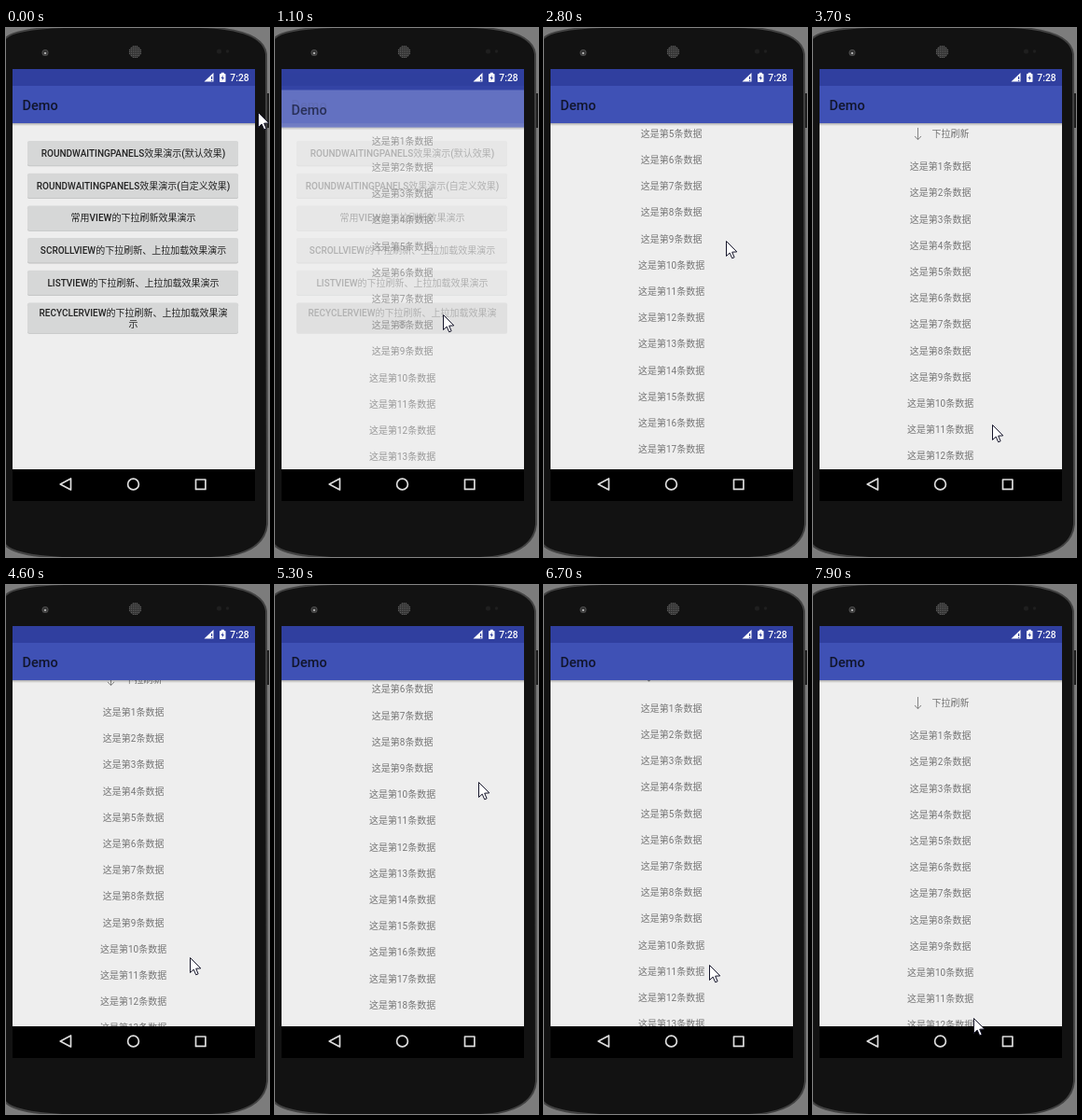
Recreate the animation shown at these times as an HTML page with a canvas. Size 282 by 567 pixels, loop 8 s.

```html
<!DOCTYPE html>
<html lang="zh-CN">
<head>
<meta charset="utf-8">
<title>Demo</title>
<style>
html, body { margin: 0; width: 100%; height: 100%; overflow: hidden; background: #7c7c7c; }
canvas { display: block; width: 282px; height: 567px; }
</style>
</head>
<body>
<canvas id="stage"></canvas>
<script>
const W = 282, H = 567, LOOP = 8000, STEP = 100;
const FONT = 'Roboto, "Noto Sans CJK SC", "Noto Sans CJK", sans-serif';
const LEFT = 7, TOP = 44, WIDTH = 260, BOTTOM = 507;
const LIST_TOP = 102, LIST_END = 473, ROW = 28.2, HEADER_GAP = 35;
const REST = 116.5, DAMPING = 0.47;

// Pointer moves: start, end, target x, target y
const MOVES = [
  [0, 300, 180, 307], [1400, 1900, 180, 370], [2100, 2800, 195, 228],
  [3000, 3800, 191, 453], [4400, 5300, 218, 211], [5300, 5500, 217, 220],
  [5700, 6700, 177, 407], [6700, 7900, 172, 464]
];
// When the finger grabs the list, and the pointer height that means zero scroll
const GRABS = [[2100, 227.8], [3100, 240.4], [5800, 257.5], [7600, 251.8]];

const PULL = '的下拉刷新、上拉加载效果演';
const BUTTONS = [
  ['ROUNDWAITINGPANELS效果演示(默认效果)'],
  ['ROUNDWAITINGPANELS效果演示(自定义效果)'],
  ['常用VIEW的下拉刷新效果演示'],
  [`SCROLLVIEW${PULL}示`],
  [`LISTVIEW${PULL}示`],
  [`RECYCLERVIEW${PULL}`, '示']
];

const canvas = document.getElementById('stage');
const ctx = canvas.getContext('2d');
const dpr = window.devicePixelRatio || 1;
canvas.width = W * dpr;
canvas.height = H * dpr;

const clamp = v => Math.min(1, Math.max(0, v));

function pointerAt(t) {
  let x = 270, y = 90;
  for (const [start, end, tx, ty] of MOVES) {
    const p = clamp((t - start) / (end - start));
    x += (tx - x) * p;
    y += (ty - y) * p;
  }
  return [x, y];
}

// Centre of the first row: follows the finger, damped when pulled past the top
function scrollAt(t) {
  const grab = GRABS.filter(g => g[0] <= t).pop();
  if (!grab) return REST;
  const over = pointerAt(t)[1] - grab[1] - REST;
  if (over < 0) return REST + over;
  return REST + (grab === GRABS[0] ? 0 : over * DAMPING);
}

function rect(x, y, w, h, fill) {
  ctx.fillStyle = fill;
  ctx.fillRect(x, y, w, h);
}

function box(x, y, w, h, r, fill) {
  ctx.beginPath();
  ctx.roundRect(x, y, w, h, r);
  ctx.fillStyle = fill;
  ctx.fill();
}

function disc(x, y, r, fill) {
  ctx.beginPath();
  ctx.arc(x, y, r, 0, Math.PI * 2);
  ctx.fillStyle = fill;
  ctx.fill();
}

function poly(points, fill) {
  ctx.beginPath();
  points.forEach(([x, y]) => ctx.lineTo(x, y));
  if (!fill) return;
  ctx.closePath();
  ctx.fillStyle = fill;
  ctx.fill();
}

function stroke(color, width) {
  ctx.strokeStyle = color;
  ctx.lineWidth = width;
  ctx.stroke();
}

function text(str, x, baseline, size, weight, color, align = 'center') {
  ctx.font = `${weight} ${size}px ${FONT}`;
  ctx.textAlign = align;
  ctx.fillStyle = color;
  ctx.fillText(str, x, baseline);
}

// Centred line with medium Latin and regular Chinese
function label(str, x, baseline) {
  const runs = str.match(/[ -~]+|[^ -~]+/g).map(run => {
    const weight = run < '~' ? 500 : 400;
    ctx.font = `${weight} 10px ${FONT}`;
    return { run, weight, width: ctx.measureText(run).width };
  });
  x -= runs.reduce((sum, r) => sum + r.width, 0) / 2;
  for (const { run, weight, width } of runs) {
    text(run, x, baseline, 10, weight, '#222', 'left');
    x += width;
  }
}

function drawPhone() {
  rect(0, 0, W, H, '#7c7c7c');
  box(279, 70, 5, 37, 1, '#1b1b1b');
  ctx.beginPath();
  ctx.moveTo(-2, 13);
  ctx.quadraticCurveTo(4, 1, 62, -1);
  ctx.lineTo(208, -1);
  ctx.quadraticCurveTo(276, 1, 279, 28);
  ctx.lineTo(280, 532);
  ctx.quadraticCurveTo(277, 565, 220, 568);
  ctx.lineTo(60, 568);
  ctx.quadraticCurveTo(4, 565, -2, 552);
  ctx.closePath();
  ctx.fillStyle = '#121212';
  ctx.fill();
  stroke('#424242', 2);

  disc(42, 26.5, 3.5, '#4c4c4c');
  disc(42, 26.5, 2.4, '#2c2c2c');
  disc(42, 27, 1.3, '#a8a8a8');
  disc(138.5, 25.5, 6.6, '#333');
  for (let y = -6; y <= 6; y += 2)
    for (let x = -6; x <= 6; x += 2)
      if (x * x + y * y < 42) disc(138.5 + x, 25.5 + y, 0.6, '#666');
  disc(228.5, 25, 2.6, '#1f1f1f');
  disc(237.5, 25, 1.8, '#1f1f1f');
}

function drawBar() {
  rect(LEFT, TOP, WIDTH, 18, '#303f9f');
  rect(LEFT, 62, WIDTH, 40, '#3f51b5');
  text('Demo', 17.6, 88, 14.5, 500, '#11152c', 'left');
  const shade = ctx.createLinearGradient(0, 102, 0, 105);
  shade.addColorStop(0, 'rgba(0,0,0,.28)');
  shade.addColorStop(1, 'rgba(0,0,0,0)');
  rect(LEFT, 102, WIDTH, 3, shade);
}

function drawMenu(pressed) {
  rect(LEFT, 62, WIDTH, BOTTOM - 62, '#eee');
  BUTTONS.forEach((lines, i) => {
    const y = 121 + 34.7 * i, two = lines.length > 1, h = two ? 32.5 : 26.5;
    box(23, y + 0.8, 226, h, 2, '#bfc0c0');
    box(23, y, 226, h, 2, two && pressed ? '#c0c1c1' : '#d6d7d7');
    lines.forEach((line, n) => label(line, 136.5, y + (two ? 14 : 17) + 12 * n));
  });
  drawBar();
}

function drawHeader(y) {
  poly([[112.5, y - 6.5], [112.5, y + 6]]);
  stroke('#858585', 1);
  poly([[109, y + 2.5], [112.5, y + 6.3], [116, y + 2.5]]);
  stroke('#858585', 1);
  text('下拉刷新', 147.6, y + 3.7, 10, 400, '#757575');
}

function drawList(first) {
  rect(LEFT, 62, WIDTH, BOTTOM - 62, '#eee');
  ctx.save();
  ctx.beginPath();
  ctx.rect(LEFT, LIST_TOP, WIDTH, LIST_END - LIST_TOP);
  ctx.clip();
  if (first > REST) drawHeader(first - HEADER_GAP);
  const start = Math.max(0, Math.floor((90 - first) / ROW));
  for (let i = start; i < start + 15; i++)
    text(`这是第${i + 1}条数据`, 136.6, first + ROW * i + 3.7, 10, 400, '#757575');
  ctx.restore();
  drawBar();
}

function drawStatus() {
  poly([[212.5, 57.5], [222.5, 57.5], [222.5, 48]], '#fff');
  rect(220, 52, 1.2, 3, '#303f9f');
  rect(220, 56, 1.2, 1, '#303f9f');
  box(229, 49, 6.5, 9, 0.7, '#fff');
  rect(230.8, 47.8, 3, 1.5, '#fff');
  poly([[232.8, 50.5], [230.6, 54], [232, 54], [231.7, 56.5], [233.9, 53], [232.5, 53]], '#303f9f');
  text('7:28', 250.5, 57, 10.3, 500, '#fff');
}

function drawNav() {
  rect(LEFT, LIST_END, WIDTH, BOTTOM - LIST_END, '#000');
  ctx.lineJoin = 'round';
  poly([[58.2, 489], [69.5, 483], [69.5, 495]], '#000');
  stroke('#ddd', 1.7);
  ctx.beginPath();
  ctx.arc(136.5, 489, 5.9, 0, Math.PI * 2);
  stroke('#ddd', 1.7);
  ctx.strokeRect(203.5, 484, 10.4, 10.4);
}

function drawPointer(x, y) {
  ctx.save();
  ctx.translate(Math.round(x) + 0.5, Math.round(y) + 0.5);
  poly([[0, 0], [0, 16], [3.7, 12.6], [6.2, 18.3], [8.6, 17.3], [6.2, 11.7], [11.3, 11.4]], '#fff');
  ctx.lineJoin = 'miter';
  stroke('#15152a', 1);
  ctx.restore();
}

function draw(t) {
  ctx.setTransform(dpr, 0, 0, dpr, 0, 0);
  drawPhone();
  ctx.save();
  ctx.beginPath();
  ctx.rect(LEFT, TOP, WIDTH, BOTTOM - TOP);
  ctx.clip();
  const open = clamp((t - 900) / 400);
  if (open < 1) drawMenu(t >= 800);
  if (open > 0) {
    ctx.globalAlpha = clamp(open * 1.4);
    ctx.translate(0, 37 * (1 - open) ** 3);
    drawList(scrollAt(t));
  }
  ctx.restore();
  drawStatus();
  drawNav();
  drawPointer(...pointerAt(t));
}

function tick(now) {
  draw(Math.floor((now % LOOP) / STEP) * STEP);
  requestAnimationFrame(tick);
}
requestAnimationFrame(tick);
</script>
</body>
</html>
```
